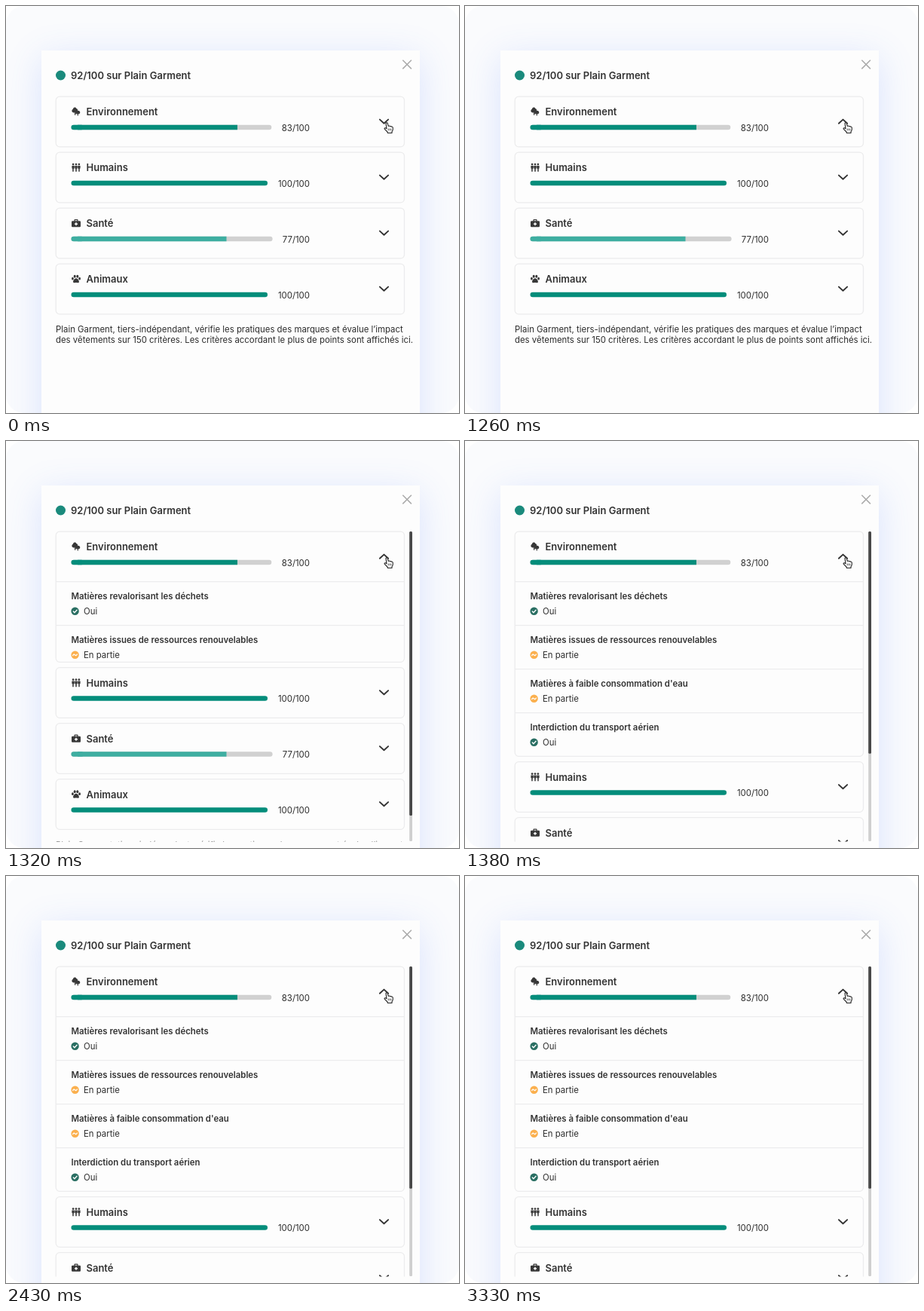
Write an HTML page that moves like this. It is 601x540 px and loops after 3360 ms.

```html
<!DOCTYPE html>
<html lang="fr">
<head>
<meta charset="utf-8">
<title>Score</title>
<style>
html, body { margin: 0; width: 100%; height: 100%; overflow: hidden; background: #fff; }
#stage { position: absolute; left: 0; top: 0; width: 601px; height: 540px; overflow: hidden; border-radius: 24px; background: #fafbfd; }
#panel { position: absolute; left: 47px; top: 59px; width: 502px; height: 640px; background: #fdfdfd; box-shadow: 0 10px 45px rgba(70, 115, 255, .18); }
svg { position: absolute; left: 0; top: 0; }
text { font: 400 11.4px Inter, sans-serif; fill: #2c2c2c; }
text.head { font-size: 13px; font-weight: 600; fill: #333; }
text.item { font-weight: 600; fill: #333; }
.line { fill: none; stroke: #ececed; stroke-width: 1.3; }
.chev { fill: none; stroke: #333; stroke-width: 1.9; stroke-linecap: round; stroke-linejoin: round; }
.icon { fill: #383838; }
.mark { fill: none; stroke: #fff; stroke-width: 1.3; stroke-linecap: round; stroke-linejoin: round; }
</style>
</head>
<body>
<div id="stage">
  <div id="panel"></div>
  <svg width="601" height="540" viewBox="0 0 601 540">
    <defs>
      <clipPath id="view"><rect x="60" y="118" width="489" height="413.5"/></clipPath>
      <clipPath id="fold"><rect id="foldBox" x="66" y="186" width="463" height="0"/></clipPath>
    </defs>
    <circle cx="72.5" cy="92" r="6.5" fill="#1a8a7c"/>
    <text class="head" x="86" y="97">92/100 sur Plain Garment</text>
    <path d="M526.3 71.8l11.6 11.6m0-11.6l-11.6 11.6" stroke="#ababab" stroke-width="1.5" fill="none"/>
    <g clip-path="url(#view)">
      <rect id="firstCard" class="line" x="66.2" y="120.2" width="462.3" height="66.6" rx="5"/>
      <g id="firstHead"></g>
      <g id="items" clip-path="url(#fold)"></g>
      <g id="below"></g>
    </g>
    <g id="bar">
      <rect x="535.2" y="120" width="3.8" height="411" rx="1.5" fill="#cfcfcf"/>
      <rect id="thumb" x="535.2" y="120" width="3.8" height="411" rx="1.5" fill="#484848"/>
    </g>
    <path transform="translate(501 154)" fill="#fff" stroke="#222" stroke-width="1.1" stroke-linejoin="round"
      d="M3 1.6C3.2.4 5 .4 5.3 1.6L6.2 5.4C7 4.7 8.1 5 8.4 5.8C9.1 5.2 10.1 5.5 10.4 6.3C11.3 5.9 12.2 6.5 12.3 7.5L12.2 10.6L11 12.8V14.5H5.4L5 13L1.4 9.4C.6 8.3 1.8 7.2 2.9 8L4 8.8Z"/>
    <path d="M507.2 162.6v2.6m1.8-2.6v2.6m1.8-2.6v2.6" stroke="#222" stroke-width=".7"/>
  </svg>
</div>
<script>
const LOOP = 3360, STEP = 30, OPEN = 1260;
const FULL = 231.5, PITCH = 74, VIEW = 411, CONTENT = 341.5;
const GROWTH = [0, 38.5, 106.5, 178, FULL]; // drawer height, one value per step
const DOWN = 'M495.9 150.6l5.6 5.2 5.6-5.2', UP = 'M495.9 155.8l5.6-5.2 5.6 5.2';
const $ = id => document.getElementById(id);

// icons are centred on 0,0
const icons = {
  tree: '<path d="M-5.6-1.2C-5.6-3-4-3.2-3.8-4.2C-3.2-6.2-.4-6.2.3-4.4C2-4 2.5-2.6 1.9-1.6C4-2 5.8-.2 5.2 1.4C5 2.6 4 3 2.9 3V5.2H1.7V3H-.8V1.2H-3.6C-5 1-5.8 0-5.6-1.2Z"/>' +
    '<path d="M-2 1h1.2v3.4h-1.2z"/>',
  people: [-3.9, 0, 3.9].map(x =>
    `<circle cx="${x}" cy="-4.2" r="1.35"/><path d="M${x - 1.7}-2.4h3.4v3.6h-.7v4.2h-.8v-3.6h-.4v3.6h-.8v-4.2h-.7z"/>`).join(''),
  kit: '<path fill-rule="evenodd" d="M-4.8-3H-2.6V-4.2Q-2.6-5.2-1.6-5.2H1.6Q2.6-5.2 2.6-4.2V-3H4.8Q6-3 6-1.8V3.8Q6 5 4.8 5H-4.8Q-6 5-6 3.8V-1.8Q-6-3-4.8-3ZM-1.4-4.1V-3H1.4V-4.1Z"/>' +
    '<path d="M0-1v4m-2-2h4" stroke="#fff" stroke-width="1.4"/>',
  paw: '<ellipse cx="-4.6" cy="-.6" rx="1.4" ry="1.9"/><ellipse cx="-1.8" cy="-3.6" rx="1.5" ry="2"/>' +
    '<ellipse cx="1.8" cy="-3.6" rx="1.5" ry="2"/><ellipse cx="4.6" cy="-.6" rx="1.4" ry="1.9"/>' +
    '<path d="M0-1C2-1 4 2 3.9 3.6C3.7 5.6 1.6 4.8 0 4.8S-3.7 5.6-3.9 3.6C-4 2-2 -1 0-1Z"/>'
};

function head(name, icon, score, fill, end, color) {
  const bar = (x, c) => `<path d="M89.8 161H${x}" stroke="${c}" stroke-width="6.6" stroke-linecap="round"/>`;
  const done = fill < end
    ? bar(end - 3.3, '#d1d1d1') + bar(100, color) + `<path d="M95 161H${fill}" stroke="${color}" stroke-width="6.6"/>`
    : bar(end - 3.3, color);
  return `<g class="icon" transform="translate(93 140.3)">${icons[icon]}</g>
    <text class="head" x="106.5" y="145">${name}</text>${done}
    <text x="403" y="165.7" text-anchor="end">${score}/100</text>
    <path class="chev" d="${DOWN}"/>`;
}

function item(title, full, i) {
  const icon = full
    ? '<circle cx="91.6" cy="225.8" r="5.2" fill="#2a6f63"/><path class="mark" d="M89.3 226l1.6 1.7 3.2-3.5"/>'
    : '<circle cx="91.6" cy="225.8" r="5.2" fill="#fbb04e"/><path class="mark" d="M88.7 226.6q1.4-2.6 2.8-.8t2.9-.8"/>';
  return `<g transform="translate(0 ${i * 58})"><path class="line" d="M66 186.7H528.5"/>
    <text class="item" x="86.5" y="210">${title}</text>${icon}
    <text x="103" y="230.2">${full ? 'Oui' : 'En partie'}</text></g>`;
}

const teal = '#048d7b';
$('firstHead').innerHTML = head('Environnement', 'tree', 83, 307, 352.3, teal);
$('items').innerHTML = [
  ['Matières revalorisant les déchets', true],
  ['Matières issues de ressources renouvelables', false],
  ['Matières à faible consommation d\'eau', false],
  ['Interdiction du transport aérien', true]
].map(([title, full], i) => item(title, full, i)).join('');
$('below').innerHTML = [
  ['Humains', 'people', 100, 347, 347, teal],
  ['Santé', 'kit', 77, 292.5, 353.6, '#3eaea1'],
  ['Animaux', 'paw', 100, 347, 347, teal]
].map((row, i) => `<g transform="translate(0 ${(i + 1) * PITCH})">
    <rect class="line" x="66.2" y="120.2" width="462.3" height="66.6" rx="5"/>${head(...row)}</g>`).join('') +
  `<text x="66" y="433.4">Plain Garment, tiers-indépendant, vérifie les pratiques des marques et évalue l’impact</text>
   <text x="66" y="447.4">des vêtements sur 150 critères. Les critères accordant le plus de points sont affichés ici.</text>`;
const chevron = $('firstHead').querySelector('.chev');

function draw(now) {
  const t = Math.floor(now % LOOP / STEP) * STEP;
  const step = Math.floor((t - OPEN) / STEP);
  const open = step >= 0;
  const drop = open ? GROWTH[Math.min(step, GROWTH.length - 1)] : 0;
  const total = CONTENT + drop;
  chevron.setAttribute('d', open ? UP : DOWN);
  $('firstCard').setAttribute('height', 66.6 + drop);
  $('foldBox').setAttribute('height', drop && drop + .8);
  $('below').setAttribute('transform', `translate(0 ${drop})`);
  $('bar').setAttribute('visibility', total > VIEW ? 'visible' : 'hidden');
  $('thumb').setAttribute('height', Math.min(VIEW, VIEW * VIEW / total));
}

const start = performance.now();
function tick() {
  draw(performance.now() - start);
  requestAnimationFrame(tick);
}
tick();
</script>
</body>
</html>
```
